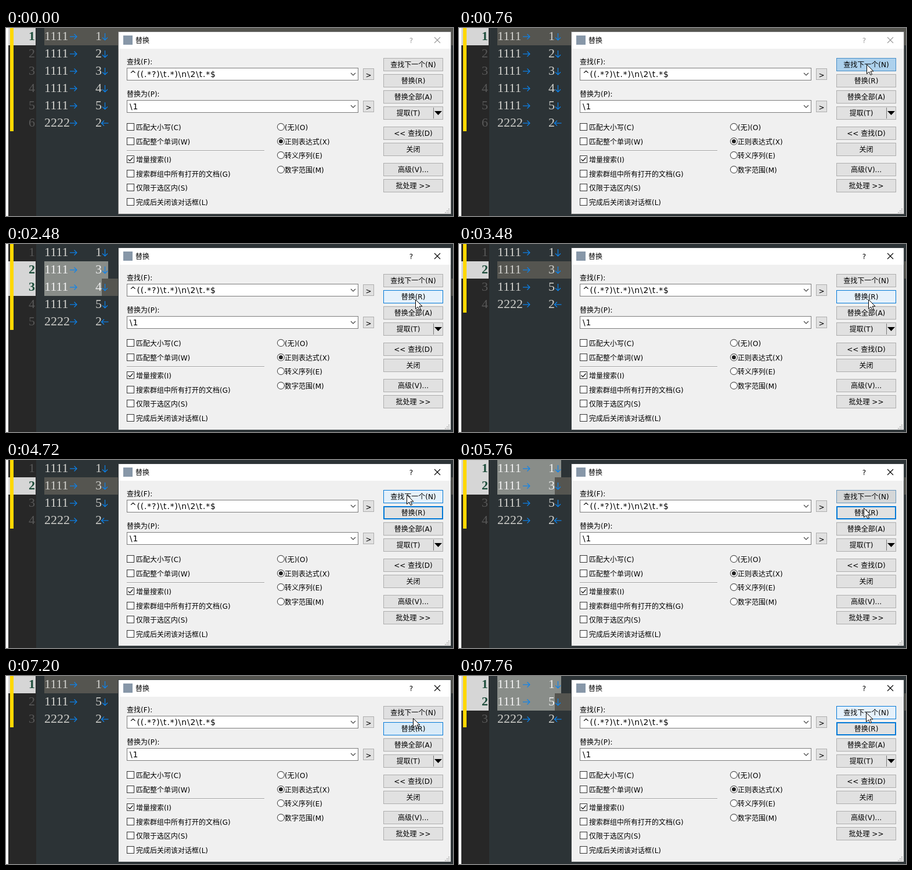
Write an HTML page with a canvas that moves like this. It is 770 px wide and 326 px high and loops after 8000 ms.

```html
<!DOCTYPE html>
<html lang="zh-CN">
<head>
<meta charset="utf-8">
<style>
html, body { margin: 0; width: 770px; height: 326px; overflow: hidden; }
canvas { display: block; }
</style>
</head>
<body>
<canvas id="stage" width="770" height="326"></canvas>
<script>
const LOOP = 8000, ROW = 30;
const c = document.getElementById('stage').getContext('2d');
const UI = '12px "DejaVu Sans", "Noto Sans CJK SC", "Noto Sans CJK", sans-serif';
const FIELD = '14px "DejaVu Sans", sans-serif';
const CODE = '22px "Liberation Serif", serif';
const BLUE = '#0078d7';

// Last digit of each 1111 line, first and last active row, whether they are selected
const docStates = [
  [0, '12345', 0, 0, false],
  [1080, '12345', 0, 1, true],
  [2240, '1345', 1, 2, true],
  [3240, '135', 1, 1, false],
  [5040, '135', 0, 1, true],
  [6440, '15', 0, 0, false],
  [7760, '15', 0, 1, true],
];
const findStates = [[0, 'normal'], [640, 'hover'], [920, 'press'], [1080, 'hover'], [1560, 'normal'],
  [4480, 'hover'], [4880, 'press'], [5040, 'hover'], [5640, 'normal'], [7200, 'hover']];
const replaceStates = [[0, 'normal'], [1080, 'default'], [1720, 'hover'], [2080, 'press'], [2240, 'hover'],
  [3080, 'press'], [3240, 'hover'], [4320, 'default'], [4880, 'normal'], [5040, 'default'],
  [5800, 'hover'], [6280, 'press'], [6440, 'hover'], [7190, 'default']];
const looks = {            // fill, border, border width
  normal: ['#e1e1e1', '#adadad', 1],
  hover: ['#e5f1fb', BLUE, 1],
  press: ['#cce4f7', '#005499', 1],
  default: ['#e1e1e1', BLUE, 2],
};
const pointerPath = [      // time, x, y
  [200, 528, 241], [360, 590, 178], [560, 676, 86], [760, 702, 63],
  [1440, 702, 63], [1520, 702, 72], [1680, 704, 87], [1840, 705, 96],
  [4120, 705, 96], [4320, 699, 83], [4520, 692, 68], [4720, 690, 60],
  [5480, 690, 60], [5760, 697, 83], [6040, 704, 94],
  [6960, 704, 94], [7200, 701, 73], [7600, 701, 63],
];

const lastIndex = (list, t) => list.findLastIndex(item => item[0] <= t);

function rect(x, y, w, h, fill) {
  c.fillStyle = fill;
  c.fillRect(x, y, w, h);
}

function box(x, y, w, h, fill, border, width = 1) {
  rect(x, y, w, h, border);
  rect(x + width, y + width, w - 2 * width, h - 2 * width, fill);
}

function text(str, x, y, color = '#000', font = UI, align = 'left', spacing = 0) {
  c.font = font;
  c.fillStyle = color;
  c.textAlign = align;
  c.letterSpacing = spacing + 'px';
  c.fillText(str, x, y);
}

function line(color, width, ...points) {
  c.strokeStyle = color;
  c.lineWidth = width;
  c.beginPath();
  points.forEach(([x, y]) => c.lineTo(x, y));
  c.stroke();
}

function polygon(fill, points, outline) {
  c.beginPath();
  points.forEach(([x, y]) => c.lineTo(x, y));
  c.closePath();
  c.fillStyle = fill;
  c.fill();
  if (outline) {
    c.strokeStyle = outline;
    c.lineWidth = 1;
    c.stroke();
  }
}

// Whitespace mark: a small arrow centred on x, y
function mark(x, y, angle) {
  c.save();
  c.translate(x, y);
  c.rotate(angle);
  line('#0a84f0', 1.2, [-6, 0], [6, 0]);
  line('#0a84f0', 1.2, [1.5, -4.5], [6, 0], [1.5, 4.5]);
  c.restore();
}

function drawEditor(t) {
  const [, digits, first, last, selected] = docStates[lastIndex(docStates, t)];
  const rows = [...digits].map(d => ['1111', d]).concat([['2222', '2']]);
  rect(0, 0, 770, 326, '#2c3336');
  rect(0, 0, 4, 326, '#fff');
  rect(4, 0, 48, 326, '#272727');
  rows.forEach(([key, value], i) => {
    const y = i * ROW, active = i >= first && i <= last;
    if (active) rect(4, y, 47, ROW, '#d6d6d6');
    if (i === last) rect(66, y, 704, ROW, '#555550');
    if (active && selected) rect(66, y, i === last ? 99 : 110, ROW, '#898d89');
    text(i + 1, 50, y + 21, active ? '#1c4c3a' : '#585858', (active ? 'bold ' : '') + CODE, 'right');
    const ink = active && selected ? '#f0f0f0' : '#d0d0cc';
    text(key, 66, y + 21, ink, CODE);
    text(value, 154, y + 21, ink, CODE);
    mark(116, y + 15, 0);
    mark(170.5, y + 15, i === rows.length - 1 ? Math.PI : Math.PI / 2);
  });
  rect(7, 0, 6, rows.length * ROW - 1, '#ffd800');
}

function button(label, y, states = [[0, 'normal']], t = 0, x = 650, w = 103, h = 23, textX = x + w / 2) {
  const i = lastIndex(states, t);
  const paint = name => box(x, y, w, h, looks[name][0], looks[name][1], looks[name][2]);
  if (i > 0) paint(states[i - 1][1]);
  c.globalAlpha = i > 0 ? Math.min(1, (t - states[i][0]) / 200) : 1;
  paint(states[i][1]);
  c.globalAlpha = 1;
  text(label, textX, y + 16, '#000', UI, 'center');
}

function field(label, value, y) {
  text(label, 208, y - 6);
  box(208, y, 399, 22, '#fff', '#7a7a7a');
  text(value, 213, y + 15.5, '#000', FIELD, 'left', 0.8);
  line('#444', 1.2, [594, y + 9], [598, y + 13], [602, y + 9]);
  button('>', y + 1, undefined, 0, 615, 19, 20);
}

function checkbox(label, y, checked) {
  box(208, y - 7, 13, 13, '#fff', '#333');
  if (checked) line('#222', 1.5, [210.5, y - 0.5], [213.5, y + 2.5], [218.5, y - 3.5]);
  text(label, 224, y + 5);
}

function circle(x, y, r, fill) {
  c.beginPath();
  c.arc(x, y, r, 0, 7);
  c.fillStyle = fill;
  c.fill();
}

function radio(label, y, checked, hovered) {
  circle(473.5, y, 6.5, hovered ? BLUE : '#333');
  circle(473.5, y, 5.5, '#fff');
  if (checked) circle(473.5, y, 3.5, '#222');
  text(label, 480, y + 5.5);
}

function drawDialog(t) {
  const active = t >= 920, glyph = active ? '#000' : '#999';
  box(193, 6, 574, 317, '#f0f0f0', active ? '#3c4244' : '#777');
  rect(194, 7, 572, 29, '#fff');
  rect(202, 13, 16, 16, '#8797a8');
  text('替换', 223, 25.5);
  text('?', 698, 26, glyph, UI, 'center');
  line(glyph, 1.1, [738, 16], [748, 26]);
  line(glyph, 1.1, [748, 16], [738, 26]);

  field('查找(F):', '^((.*?)\\t.*)\\n\\2\\t.*$', 69);
  field('替换为(P):', '\\1', 125);

  checkbox('匹配大小写(C)', 172);
  checkbox('匹配整个单词(W)', 197);
  rect(208, 212, 237, 1, '#a0a0a0');
  rect(208, 213, 237, 1, '#fff');
  checkbox('增量搜索(I)', 228, true);
  checkbox('搜索群组中所有打开的文档(G)', 253);
  checkbox('仅限于选区内(S)', 277);
  checkbox('完成后关闭该对话框(L)', 302);

  radio('(无)(O)', 171.5);
  radio('正则表达式(X)', 196.5, true);
  radio('转义序列(E)', 220.5);
  radio('数字范围(M)', 245.5, false, t >= 200 && t < 320);

  button('查找下一个(N)', 52, findStates, t);
  button('替换(R)', 80, replaceStates, t);
  button('替换全部(A)', 108);
  button('提取(T)', 136, undefined, 0, 650, 103, 23, 693);
  rect(736, 138, 1, 19, '#777');
  polygon('#000', [[738, 144], [751, 144], [744.5, 151]]);
  button('<< 查找(D)', 171);
  button('关闭', 199);
  button('高级(V)...', 234);
  button('批处理 >>', 262);

  for (let i = 0; i < 3; i++)
    for (let j = 0; j <= i; j++) rect(762 - 3 * j, 313 + 3 * i, 2, 2, '#bfbfbf');
}

function drawPointer(t) {
  if (t < pointerPath[0][0]) return;
  const i = lastIndex(pointerPath, t);
  const [t0, x0, y0] = pointerPath[i];
  const [t1, x1, y1] = pointerPath[i + 1] || [LOOP, x0, y0];
  const k = (t - t0) / (t1 - t0);
  c.save();
  c.translate(Math.round(x0 + (x1 - x0) * k) + 0.5, Math.round(y0 + (y1 - y0) * k) + 0.5);
  polygon('#fff', [[0, 0], [0, 16], [4, 12.5], [6.5, 18], [9, 17], [6.5, 11.5], [11.5, 11.5]], '#000');
  c.restore();
}

function frame() {
  const t = performance.now() % LOOP;
  drawEditor(t);
  drawDialog(t);
  drawPointer(Math.floor(t / 40) * 40);
  requestAnimationFrame(frame);
}
frame();
</script>
</body>
</html>
```
